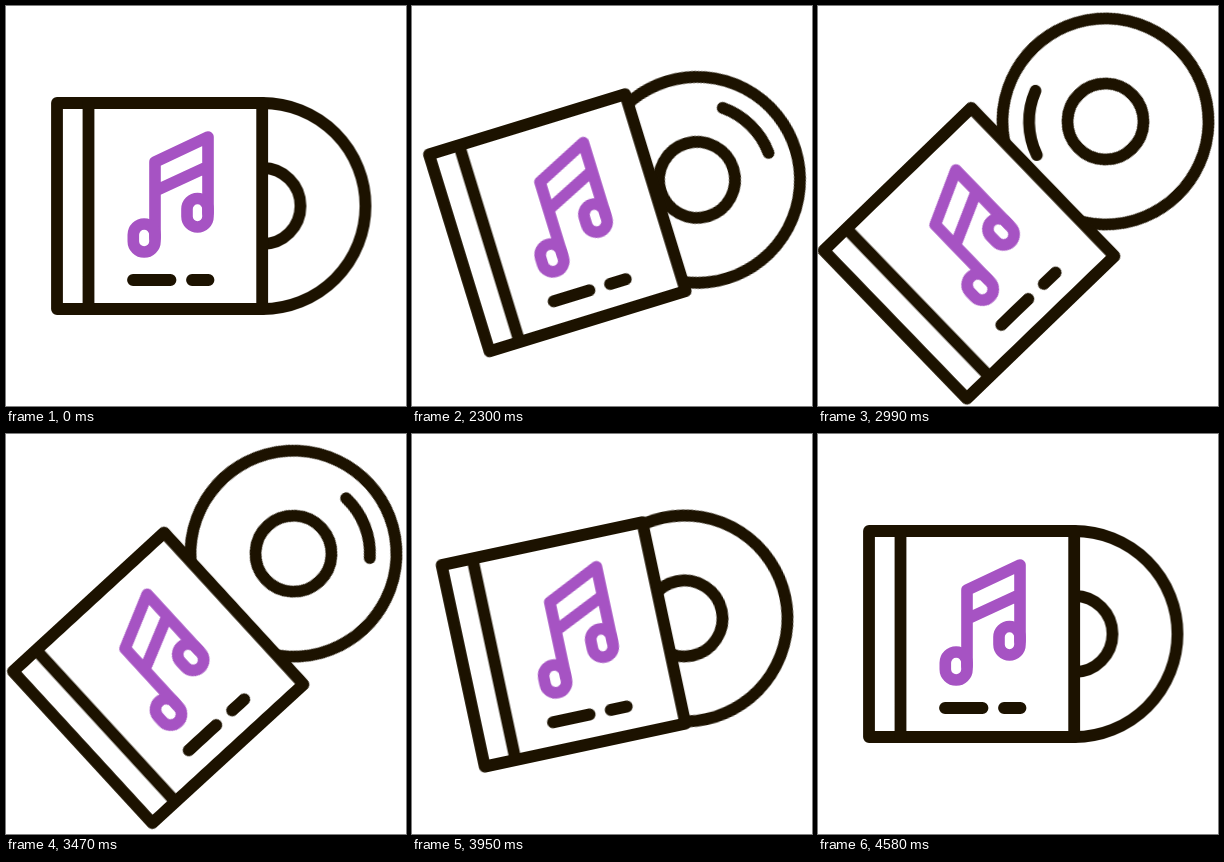
An HTML page for the animation above (4.61 s loop, 400 by 400 pixels).

```html
<!DOCTYPE html>
<html lang="en">
<head>
<meta charset="utf-8">
<title>Music album</title>
<style>
  html, body { margin: 0; width: 100%; height: 100%; overflow: hidden; background: #fff; }
  svg { display: block; width: 100vw; height: 100vh; }
  g { fill: none; stroke-width: 11.8; stroke-linecap: round; stroke-linejoin: round; }
  .ink { stroke: #1c1200; }
  .note { stroke: #a653c3; stroke-width: 11.6; }
  .paper { fill: #fff; }
  #album { transform-origin: 200px 200px; }
  #shine { transform-origin: 0 0; }
</style>
</head>
<body>
<svg viewBox="0 0 400 400">
  <g id="album" class="ink">
    <g id="disc">
      <g transform="translate(256.5 200)">
        <circle class="paper" r="103"/>
        <circle r="38"/>
        <path id="shine" d="M69.4-32.1A76.500 76.500 0 0 1 69.4 32.1"/>
      </g>
    </g>
    <g id="box">
      <rect class="paper" x="51" y="97" width="205.200" height="206"/>
      <path d="M82.500 97V303M127 274H164.500M186 274H202.500"/>
      <g class="note">
        <path d="M149 232V156L202 131V207M149 185L202 160.500"/>
        <rect x="127.300" y="218" width="21.700" height="28" rx="10.850"/>
        <rect x="181" y="192.500" width="21" height="28.500" rx="10.500"/>
      </g>
    </g>
  </g>
</svg>
<script>
  const LOOP = 4610, OPEN = 2000, PEAK = 3200, SHUT = 4560;
  const curve = (...p) => `cubic-bezier(${p})`;
  const slideOut = curve(0.15, 0, 0.2, 1);
  const swingBack = curve(0.6, 0, 0.42, 1.3);

  // Each step: time, transform, easing towards the next step.
  function play(id, ...steps) {
    const frames = steps.map(([time, transform, easing = "linear"]) =>
      ({ offset: time / LOOP, transform, easing }));
    document.getElementById(id).animate(frames, { duration: LOOP, iterations: Infinity });
  }

  // Rest, move to the far pose, come back, rest.
  const outAndBack = (id, rest, far, out, back) =>
    play(id, [0, rest], [OPEN, rest, out], [PEAK, far, back], [SHUT, rest], [LOOP, rest]);

  outAndBack("album", "rotate(0deg)", "rotate(-45.3deg)", curve(0.14, 0, 0.39, 1), swingBack);
  outAndBack("box", "translateX(0px)", "translateX(-22px)", slideOut, curve(0.38, 0, 0.15, 1));
  outAndBack("disc", "translateX(0px)", "translateX(66.3px)", slideOut, swingBack);

  const from = "rotate(-135deg)", to = "rotate(585deg)";
  play("shine", [0, from], [OPEN, from, curve(0.333, 0.406, 0.667, 0.95)], [SHUT, to], [LOOP, to]);
</script>
</body>
</html>
```
